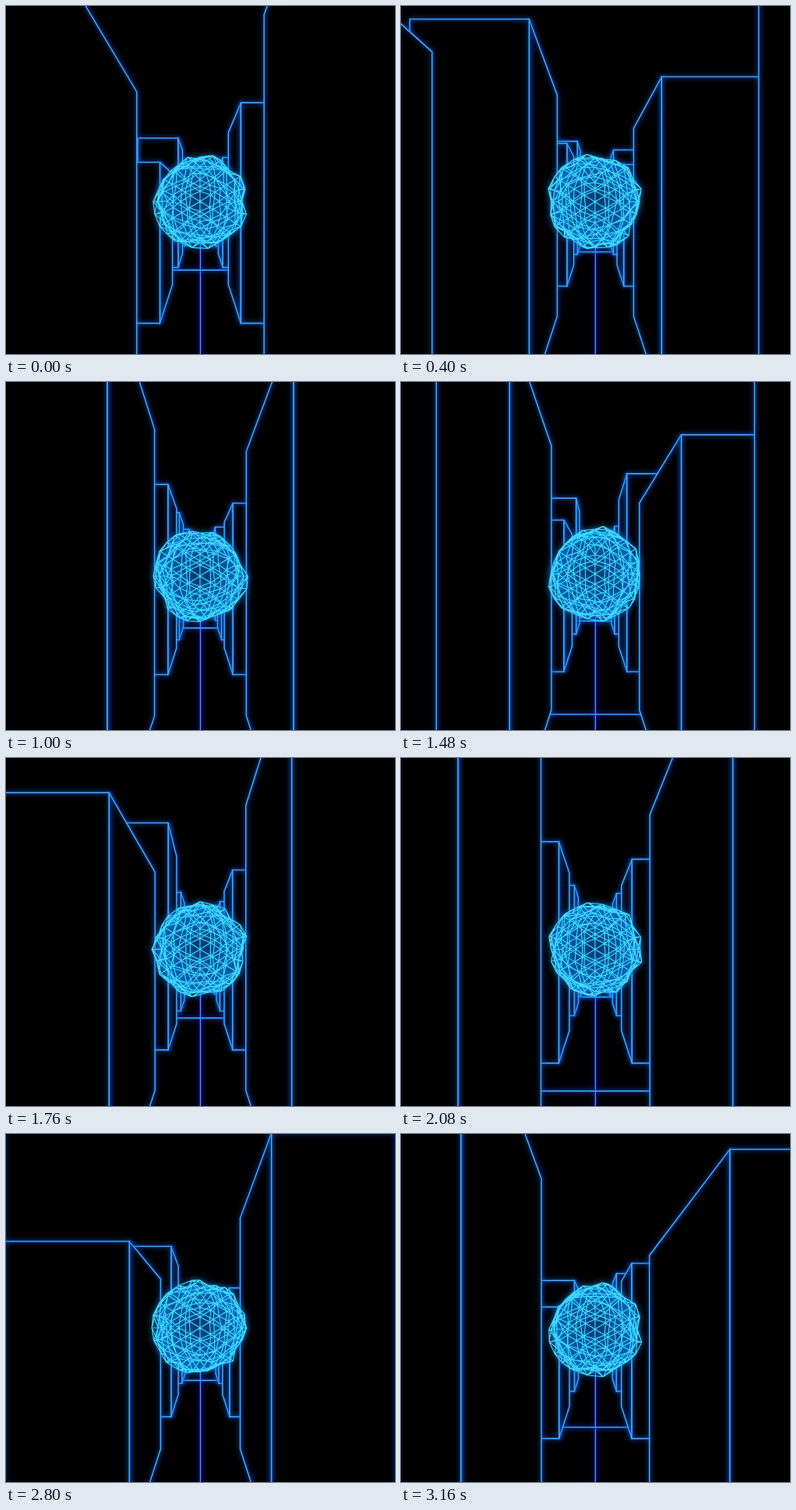
These frames come from a looping animation (499 by 447 pixels, 3200 ms). An HTML page with a canvas:

```html
<!DOCTYPE html>
<html lang="en">
<head>
<meta charset="utf-8">
<title>Neon street</title>
<style>
  html, body { margin: 0; width: 100%; height: 100%; overflow: hidden; background: #000; }
  canvas { display: block; }
</style>
</head>
<body>
<canvas id="stage" width="499" height="447"></canvas>
<script>
const W = 499, H = 447, LOOP = 3200, STEP = 40, STEPS = LOOP / STEP;
const CX = 249.4, HORIZON = 247.4, FOCUS = 64, FLOOR = 3.08;
const SPEED = 0.14785, DEPTH = 0.553, OUTER = 2.8, NEAR = 0.05, FAR = 4.5;
const LINE_GAP = 2.212;
const ctx = document.getElementById('stage').getContext('2d');

// Roof heights above eye level, nearest row first
const LEFT = [1.68, .9, 2.71, 1.94, 3.17, 2.78, 2.93, 1.73, 3.96, 2.98, 3.1, 1.2, 2.74, .54, 2.19];
const RIGHT = [2.89, 2.37, 1.84, 1.2, 2.69, 2.2, 1.63, 3.2, 2.5, 2.5, 2.71, 2.73, 1.32, 1.74, 2.52];

function path(points) {
  ctx.beginPath();
  points.forEach(([x, y]) => ctx.lineTo(x, y));
}

// Strokes the current path as a bright core inside a soft halo
function neon(core, halo) {
  ctx.shadowColor = halo;
  ctx.strokeStyle = halo;
  ctx.shadowBlur = 7;
  ctx.globalAlpha = 0.22;
  ctx.lineWidth = 4;
  ctx.stroke();
  ctx.globalAlpha = 1;
  ctx.strokeStyle = core;
  ctx.lineWidth = 1.4;
  ctx.stroke();
  ctx.shadowBlur = 0;
}

function wall(points) {
  path(points);
  ctx.closePath();
  ctx.fillStyle = '#000';
  ctx.fill();
  neon('#4aaeff', '#0064e0');
}

function building(side, front, height) {
  const back = FOCUS / (front + DEPTH);
  const near = FOCUS / Math.max(front, NEAR);
  const at = (off, k) => [CX + side * off, HORIZON + k * off];
  wall([at(near, -height), at(back, -height), at(back, FLOOR), at(near, FLOOR)]);
  if (front <= NEAR) return;
  const out = CX + side * near * OUTER;
  const top = HORIZON - height * near, base = HORIZON + FLOOR * near;
  wall([at(near, -height), [out, top], [out, base], at(near, FLOOR)]);
}

function road(step) {
  path([[CX, HORIZON], [CX, H + 5]]);
  neon('#5a90ff', '#0018e8');
  const first = (2.145 - SPEED * step) % LINE_GAP + LINE_GAP;
  for (let d = first % LINE_GAP; d < FAR; d += LINE_GAP) {
    const off = FOCUS / d, y = HORIZON + FLOOR * off;
    path([[CX - off * OUTER, y], [CX + off * OUTER, y]]);
    neon('#4aaeff', '#0050e8');
  }
}

function street(step) {
  for (let i = LEFT.length - 1; i >= 0; i--) {
    // The later batch of rows follows a little closer
    const front = 0.231 + i - SPEED * step - (i > 5 ? 0.18 : 0);
    if (front + DEPTH < NEAR || front > FAR) continue;
    building(-1, front, LEFT[i]);
    building(1, front, RIGHT[i]);
  }
}

// Icosahedron with each face split into 16
function sphere() {
  const g = (1 + Math.sqrt(5)) / 2, verts = [], edges = new Map(), seen = new Map();
  const add = p => {
    const len = Math.hypot(...p), v = p.map(c => c / len);
    const key = v.map(c => Math.round(c * 1000)).join();
    if (!seen.has(key)) {
      seen.set(key, verts.length);
      verts.push(v);
    }
    return seen.get(key);
  };
  const join = (a, b) => edges.set(Math.min(a, b) * 1000 + Math.max(a, b), [a, b]);
  const mid = (a, b) => add(verts[a].map((c, k) => c + verts[b][k]));
  const dist = (a, b) => Math.hypot(...verts[a].map((c, k) => c - verts[b][k]));
  const split = (a, b, c, level) => {
    if (!level) {
      join(a, b);
      join(b, c);
      join(c, a);
      return;
    }
    const ab = mid(a, b), bc = mid(b, c), ca = mid(c, a);
    split(a, ab, ca, level - 1);
    split(ab, b, bc, level - 1);
    split(ca, bc, c, level - 1);
    split(ab, bc, ca, level - 1);
  };
  for (const a of [-1, 1]) for (const b of [-g, g]) {
    add([a, b, 0]);
    add([0, a, b]);
    add([b, 0, a]);
  }
  for (let a = 0; a < 12; a++) for (let b = a + 1; b < 12; b++) for (let c = b + 1; c < 12; c++)
    if (Math.max(dist(a, b), dist(b, c), dist(a, c)) < 1.1) split(a, b, c, 2);
  return { verts, edges: [...edges.values()] };
}

const MESH = sphere();
const hash = n => {
  const s = Math.sin(n * 127.1 + 3.7) * 43758.5453;
  return s - Math.floor(s);
};

// A see-through mesh: the far side shows between the near edges
function ball(step) {
  const turn = 2 * Math.PI / STEPS;
  const cy = 248.5 + 3 * Math.sin((step + 12) * turn);
  const pts = MESH.verts.map(([x, y, z], i) => {
    const beat = 2 + Math.floor(hash(i + 500) * 3);
    const r = 1 + 0.075 * Math.sin(hash(i) * 6.283 + step * beat * turn);
    const scale = 57 * r * 6 / (6 - z * r);
    return [CX - 0.5 + x * scale, cy - y * scale];
  });
  ctx.beginPath();
  ctx.arc(CX - 0.5, cy, 55, 0, 7);
  const fill = ctx.createRadialGradient(CX, cy - 8, 8, CX, cy, 56);
  fill.addColorStop(0, '#04204a');
  fill.addColorStop(1, '#06488c');
  ctx.fillStyle = fill;
  ctx.fill();
  ctx.beginPath();
  for (const [a, b] of MESH.edges) {
    ctx.moveTo(...pts[a]);
    ctx.lineTo(...pts[b]);
  }
  ctx.lineJoin = 'round';
  ctx.strokeStyle = '#40d8ff';
  ctx.shadowColor = '#0090f0';
  ctx.shadowBlur = 9;
  ctx.lineWidth = 1.15;
  ctx.stroke();
  ctx.shadowBlur = 0;
}

function draw(now) {
  const step = Math.floor((now % LOOP) / STEP);
  ctx.fillStyle = '#000';
  ctx.fillRect(0, 0, W, H);
  road(step);
  street(step);
  ball(step);
}

let start;
function tick(now) {
  start ??= now;
  draw(now - start);
  requestAnimationFrame(tick);
}
draw(0);
requestAnimationFrame(tick);
</script>
</body>
</html>
```
